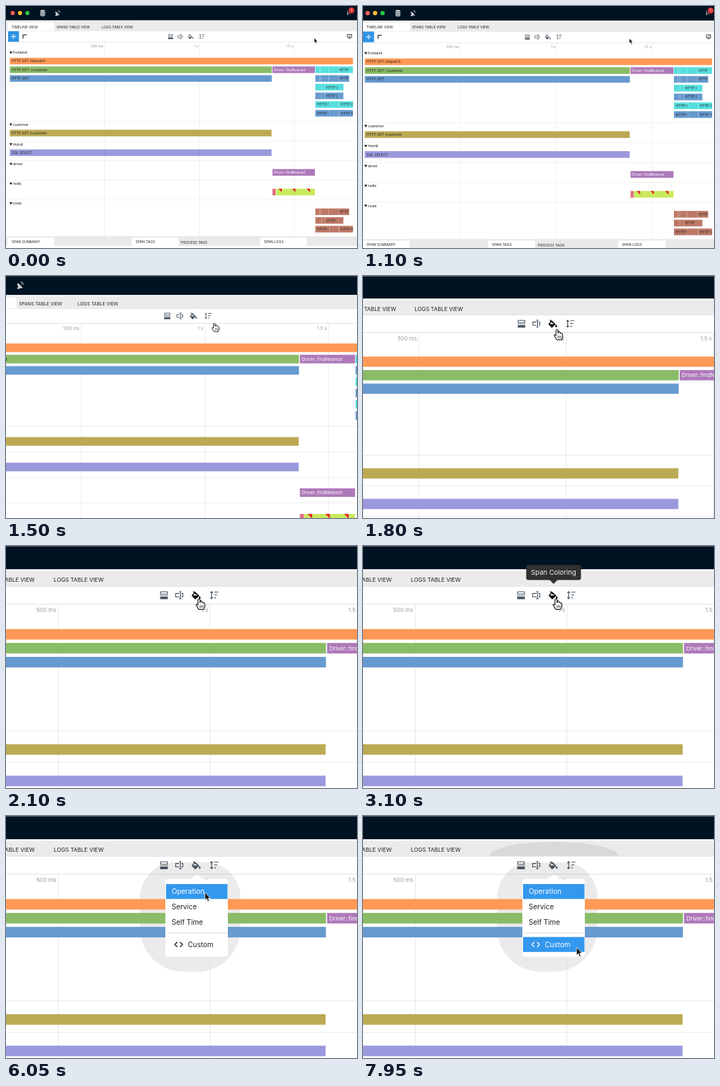
Recreate the animation shown at these times as an HTML page with a canvas. Size 500 px wide and 345 px high, loop 8000 ms.

```html
<!DOCTYPE html>
<html lang="en">
<head>
<meta charset="utf-8">
<title>Trace timeline</title>
<style>
html, body { margin: 0; width: 100%; height: 100%; overflow: hidden; background: #fff; }
canvas { display: block; }
</style>
</head>
<body>
<canvas id="stage" width="500" height="345"></canvas>
<script>
const ctx = document.getElementById('stage').getContext('2d');
const LOOP = 8000, W = 500, H = 345, ZOOM = 1.6;
const TEAL = '#55dede', BLUE = '#679acf', PURPLE = '#ae78b9', BROWN = '#bd7865';
const ACCENT = '#3398ee';

// Cursor path in page coordinates: time, x, y
const CURSOR = [
  [550, 439, 45.5], [850, 418, 45.5], [1100, 378, 45.6], [1300, 330, 48], [1500, 286, 51.5],
  [1650, 273, 50.5], [1800, 267, 49], [2000, 265.6, 46.9],
  [5700, 265.6, 46.9], [5900, 268, 56], [6500, 279, 103], [6800, 283.8, 116.9]
];

const clamp = v => Math.max(0, Math.min(1, v));
const ramp = (t, from, to) => clamp((t - from) / (to - from));
const easeInOut = u => u < .5 ? 2 * u * u : 1 - 2 * (1 - u) ** 2;

function cursorAt(t) {
  const next = CURSOR.findIndex(p => p[0] > t);
  if (next === 0) return CURSOR[0].slice(1);
  if (next < 0) return CURSOR[CURSOR.length - 1].slice(1);
  const a = CURSOR[next - 1], b = CURSOR[next], u = ramp(t, a[0], b[0]);
  return [a[1] + (b[1] - a[1]) * u, a[2] + (b[2] - a[2]) * u];
}

function rect(x0, y0, x1, y1, color) {
  ctx.fillStyle = color;
  ctx.fillRect(x0, y0, x1 - x0, y1 - y0);
}

function round(x0, y0, x1, y1, r, color) {
  ctx.fillStyle = color;
  ctx.beginPath();
  ctx.roundRect(x0, y0, x1 - x0, y1 - y0, r);
  ctx.fill();
}

function disc(x, y, r, color) {
  ctx.fillStyle = color;
  ctx.beginPath();
  ctx.arc(x, y, r, 0, 7);
  ctx.fill();
}

function text(str, x, y, color = '#222', size = 5, align = 'left') {
  ctx.font = `${size}px Inter, sans-serif`;
  ctx.textAlign = align;
  ctx.textBaseline = 'alphabetic';
  ctx.fillStyle = color;
  ctx.fillText(str, x, y + size * .36);
}

// Draws an SVG path at a position, filled and/or stroked
function shape(x, y, d, { fill, stroke, width = .8 }) {
  const path = new Path2D(d);
  ctx.save();
  ctx.translate(x, y);
  ctx.lineWidth = width;
  ctx.lineJoin = 'round';
  if (fill) { ctx.fillStyle = fill; ctx.fill(path); }
  if (stroke) { ctx.strokeStyle = stroke; ctx.stroke(path); }
  ctx.restore();
}

function bar(x0, x1, y, color, labels = [], ink = '#222') {
  const bottom = y + 9.4;
  rect(x0, y, x1, bottom, color);
  ctx.save();
  ctx.beginPath();
  ctx.rect(x0, y, x1 - x0, 9.4);
  ctx.clip();
  for (const [str, x] of labels) text(str, x, y + 4.7, ink);
  ctx.restore();
}

// Short request spans: thin dividers and labels clipped to their slots
function requests(y, end, color, labels, dividers) {
  bar(440.6, end, y, color, labels);
  for (const x of dividers) rect(x, y, x + .5, y + 9.4, 'rgba(255,255,255,.55)');
}

function drawHeader(hover) {
  rect(0, 0, W, 20.6, '#001322');
  rect(0, 20.6, W, 22.6, '#f3f3f5');
  rect(0, 22.3, W, 35.6, '#ebebeb');
  ['#ff5f57', '#febc2e', '#28c840'].forEach((c, i) => disc(9.5 + 10.5 * i, 10, 3, c));
  shape(52.2, 10, 'M-3.4-3a3.4 1.5 0 0 1 6.8 0v6a3.4 1.5 0 0 1-6.8 0z', { fill: '#d9dee2' });
  shape(52.2, 10, 'M-3.4-2.6q3.4 2 6.8 0M-3.4-.2q3.4 2 6.8 0M-3.4 2.2q3.4 2 6.8 0', { stroke: '#001322', width: .7 });
  shape(73.5, 10, 'M-2.8-2.6A4.3 4.3 0 0 0 2.8 3zM-3.6 4l1.5-2.6 2 2.6z', { fill: '#d9dee2' });
  shape(73.5, 10, 'M0 0l2-2M.4-3.8a3.6 3.6 0 0 1 3.2 3.2', { stroke: '#d9dee2', width: .7 });
  shape(488.5, 10, 'M-2-3v6M2-3v2q0 2-4 2', { stroke: '#d9dee2' });
  disc(492.2, 6.3, 4.2, '#db3737');
  text('1', 492.2, 6.3, '#fff', 5, 'center');

  rect(2.5, 23.5, 69, 36, '#fff');
  text('TIMELINE VIEW', 8, 29.8);
  text('SPANS TABLE VIEW', 72, 30);
  text('LOGS TABLE VIEW', 136.3, 30);

  rect(0, 35.6, W, 51.6, '#fff');
  rect(0, 35.4, W, 35.9, '#dcdce8');
  rect(0, 51.4, W, 51.9, '#d8d8d8');
  rect(3, 36, 18.5, 51, '#2f93e4');
  shape(10.8, 43.5, 'M-3 0H3M0-3V3M-2-1L-3 0-2 1M2-1L3 0 2 1M-1-2L0-3 1-2M-1 2L0 3 1 2', { stroke: '#fff' });
  shape(26.5, 43.5, 'M-2.2 3V-2.2H3', { stroke: '#555', width: 1.6 });

  const gray = '#4a5560';
  shape(234.4, 43.6, 'M-3-3H3V-.8H-3z', { stroke: gray, width: .7 });
  shape(234.4, 43.6, 'M-3.5 .4h1.2M-1.6 .4h1.2M.4 .4h1.2M2.3 .4h1.2', { stroke: gray, width: .6 });
  shape(234.4, 43.6, 'M-3.4 1.3H3.4V3.6H-3.4z', { fill: gray });
  shape(248, 43.6, 'M0-1.5H-3.2V1.5H0M2-1.5H3.2V1.5H2M1-3.2V3.2M0-3.2H2M0 3.2H2', { stroke: gray, width: .7 });
  const ink = hover ? '#000' : gray;
  shape(263.2, 43.6, 'M-1.4-2.6L2 .5-1 3.2-3.6 .4z', { stroke: ink, width: .9 });
  shape(263.2, 43.6, 'M-3.3 .3H1.8L-1 3zM3 .6q1.6 2.4 0 2.6-1.6-.2 0-2.6z', { fill: ink });
  shape(263.2, 43.6, 'M-2.8-3.4L-.2-.8', { stroke: ink });
  shape(279.2, 43.6, 'M-2.4-3V3M-3.5-2L-2.4-3.2-1.3-2M-3.5 2L-2.4 3.2-1.3 2M0-2.7H3.7M0-.2H2.6M0 2.4H1.5', { stroke: gray, width: .75 });
  shape(489.3, 43, 'M-3-2.4H3V1.8H-3zM-1.6 3.2H1.6M-1 .8L1.4-1.4', { stroke: '#333', width: .9 });
}

function drawTimeline() {
  ['500 ms', '1 s', '1.5 s'].forEach((label, i) => {
    const x = 140.2 + 135.3 * i;
    rect(x - .2, 52, x + .2, 328, '#dcdcdc');
    text(label, x - 1.8, 57, '#999', 5, 'right');
  });
  [164.4, 192.5, 220.5, 248.5, 276.6].forEach(y => rect(0, y - .2, W, y + .2, '#dedede'));
  ['frontend', 'customer', 'mysql', 'driver', 'redis', 'route'].forEach((name, i) => {
    const y = i ? 141 + 28.05 * i : 66.5;
    shape(7, y, 'M-2-1.5H2L0 2z', { fill: '#111' });
    text(name, 10, y, '#111');
  });

  const row = i => 73.8 + 12.4 * i;
  const group = i => 176.4 + 28.05 * i;
  const early = [446, 448.5, 459, 474], late = [460, 474.5];
  const pair = [['HTTP (', 443.3], ['HTTP G', 477]];

  bar(5.5, 494.2, row(0), '#ff9955', [['HTTP GET /dispatch', 8]]);
  bar(5.5, 378.6, row(1), '#8abb66', [['HTTP GET: /customer', 8]]);
  bar(5.5, 378.6, row(2), BLUE, [['HTTP GET', 8]]);
  bar(379.6, 440, row(1), PURPLE, [['Driver::findNearest', 381.6]], '#fff');
  requests(row(1), 494.2, TEAL, [['HTTP', 474.5]], early);
  requests(row(2), 488.8, BLUE, [['HTTP', 474.5]], early);
  requests(row(3), 480.6, TEAL, [['HTTP (', 456]], [449, 454.5]);
  requests(row(4), 480.6, BLUE, [['HTTP (', 456]], [449, 454.5]);
  requests(row(5), 494.2, TEAL, pair, late);
  requests(row(6), 494.2, BLUE, pair, late);

  bar(5.5, 378.3, group(0), '#bba953', [['HTTP GET /customer', 8]]);
  bar(5.5, 378.3, group(1), '#9a99dd', [['SQL SELECT', 8]]);
  bar(379.6, 440, group(2), PURPLE, [['Driver::findNearest', 381.6]], '#fff');
  bar(379.6, 384, group(3), '#e06c80');
  bar(384.4, 440, group(3), '#c8ea5e');
  [388, 407.4, 428].forEach(x => shape(x, group(3), 'M0 0H5V5z', { fill: '#e8202c' }));

  requests(group(4), 488.8, BROWN, [['HTTP', 474.5]], early);
  requests(group(4) + 12.4, 480.6, BROWN, [['HTTP', 456]], [449, 454.5]);
  requests(group(4) + 24.8, 494.2, BROWN, pair, late);
}

function drawFooter() {
  rect(0, 328.2, W, 342.5, '#e9e9e9');
  rect(0, 342.5, W, H, '#fff');
  [2, 179, 362].forEach(x => rect(x, 330.5, x + 66.5, 342.5, '#fff'));
  text('SPAN SUMMARY', 8, 336.3);
  text('SPAN TAGS', 184.5, 336.3);
  text('PROCESS TAGS', 249, 337.3);
  text('SPAN LOGS', 367.5, 336.3);
}

function drawTooltip() {
  round(232.5, 27, 310.5, 48.5, 3, '#303030');
  shape(271.5, 48, 'M-6 0H6L0 6z', { fill: '#303030' });
  text('Span Coloring', 271.5, 37.8, '#f4f4f4', 9.6, 'center');
}

// Wide flat shadow that lies behind the spans
function drawShadow(t) {
  const shade = 'rgba(0,0,0,.08)';
  ctx.globalAlpha = ramp(t, 5200, 5300);
  round(191, 66, 334, 222, [50, 50, 62, 62], shade);
  if (t < 6400) return;
  ctx.save();
  ctx.beginPath();
  ctx.rect(0, 36, W, 20.7);
  ctx.clip();
  ctx.fillStyle = shade;
  ctx.beginPath();
  ctx.ellipse(272, 57, 92, 20, 0, 0, 7);
  ctx.fill();
  ctx.restore();
}

function drawMenu(pointerY) {
  shape(272, 90.5, 'M-11 0L0-7 11 0z', { fill: '#fff' });
  round(227, 90, 316, 200.5, 3, '#fff');
  rect(228, 166.5, 315.5, 167.5, '#dadada');
  const items = [['Operation', 97], ['Service', 118.7], ['Self Time', 140.4], ['Custom', 172.5]];
  items.forEach(([label, top], i) => {
    const active = i === 0 || (pointerY >= top && pointerY < top + 21.3);
    const ink = active ? '#fff' : '#222';
    if (active) rect(228, top, 315.5, top + 21.3, ACCENT);
    text(label, i === 3 ? 259 : 236, top + 10.8, ink, 10);
    if (i === 3) shape(246, top + 10.8, 'M-2-3.5L-5.5 0-2 3.5M2-3.5L5.5 0 2 3.5', { stroke: ink, width: 1.4 });
  });
}

function drawCursor(x, y, hand) {
  if (hand) {
    shape(x, y, 'M-.9.7Q0-.5.9.7V3.4Q2-.1+2.7 3.3 3.6 2.7 4 3.8 5 3.2 5.2 4.8V7L4.3 9.4H-.2L-2.6 5.6Q-2.6 4.2-.9 5.4z',
      { fill: '#fff', stroke: '#222', width: .75 });
    shape(x, y, 'M1 5.6V8M2.3 5.6V8M3.6 5.6V8', { stroke: '#222', width: .5 });
  } else {
    shape(x, y, 'M0 0V7L1.6 5.5 2.7 8.2 4 7.6 2.9 5.1H5z', { fill: '#111', stroke: '#fff', width: .5 });
  }
}

function draw(t) {
  const scale = 1 + (ZOOM - 1) * easeInOut(ramp(t, 1000, 2000));
  const page = () => ctx.setTransform(scale, 0, 0, scale, 250 * (1 - scale), .5 * (scale - 1));
  const screen = () => { ctx.setTransform(1, 0, 0, 1, 0, 0); ctx.globalAlpha = 1; };
  const [x, y] = cursorAt(t);
  const onToolbar = x < 292 && y < 53;
  const menuOpen = t >= 5200;

  screen();
  rect(0, 0, W, H, '#fff');
  page();
  drawHeader(onToolbar && x < 270);
  screen();
  if (menuOpen) drawShadow(t);
  ctx.globalAlpha = 1;
  page();
  drawTimeline();
  drawFooter();

  screen();
  ctx.globalAlpha = ramp(t, 2150, 2250) * (1 - ramp(t, 4450, 4550));
  if (ctx.globalAlpha > 0) drawTooltip();
  if (menuOpen) {
    ctx.globalAlpha = ramp(t, 5200, 5300);
    drawMenu(y * ZOOM);
  }
  ctx.globalAlpha = 1;
  page();
  drawCursor(x, y, onToolbar);

  screen();
  if (t >= 4550 && t < 5050) {
    ctx.strokeStyle = '#cb1a2c';
    ctx.lineWidth = 2;
    ctx.beginPath();
    ctx.arc(274.8, 74, 20.3, 0, 7);
    ctx.stroke();
  }
}

const start = performance.now();
function tick() {
  draw((performance.now() - start) % LOOP);
  requestAnimationFrame(tick);
}
tick();
</script>
</body>
</html>
```
